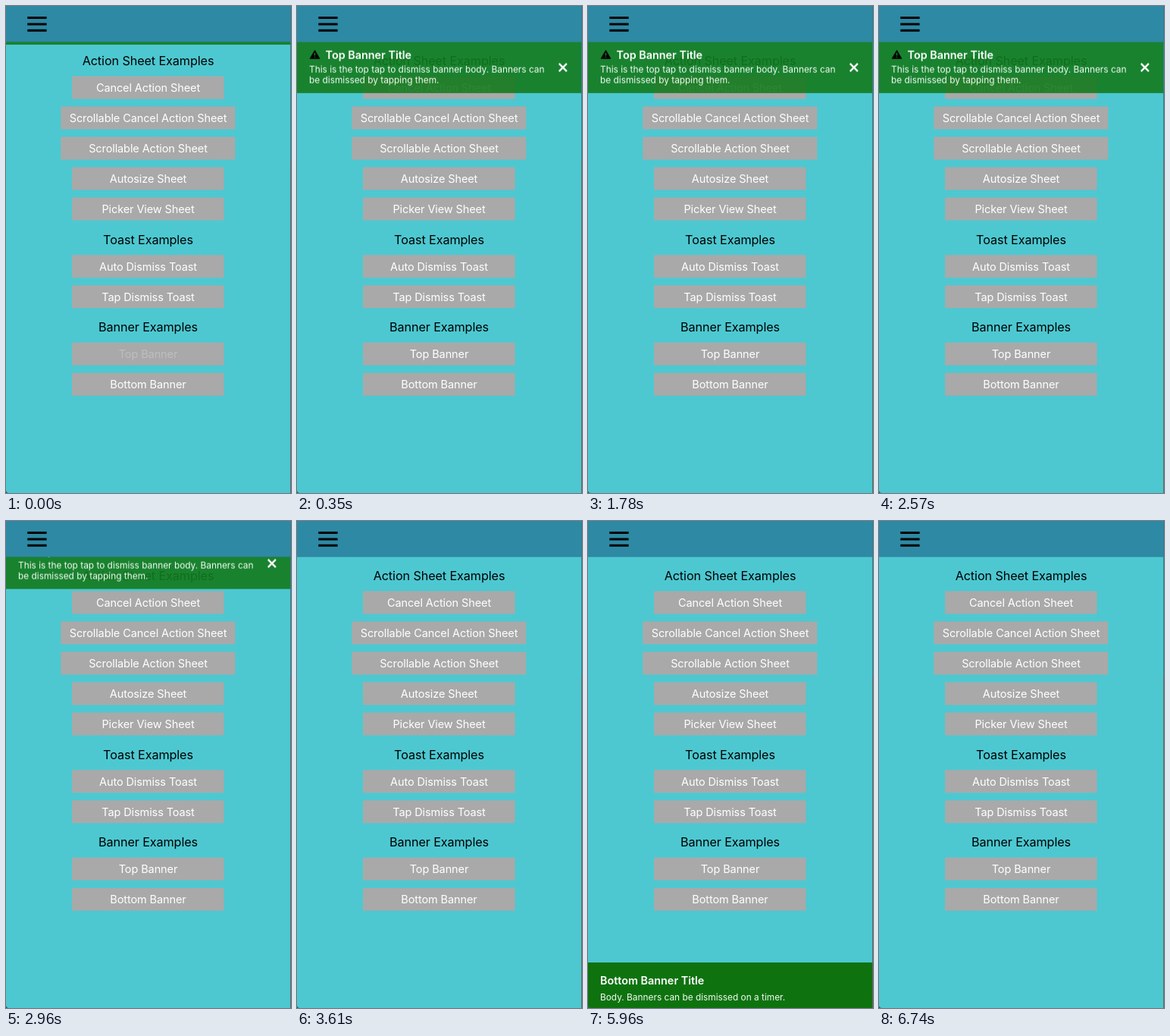
An HTML page for the animation above (6.78 s loop, 376 by 642 pixels).

```html
<!DOCTYPE html>
<html lang="en">
<head>
<meta charset="utf-8">
<title>Banner demo</title>
<style>
  html, body { margin: 0; width: 100%; height: 100%; overflow: hidden; background: #26565c; }
  svg { display: block; width: 376px; height: 642px; font-family: Inter, "Open Sans", sans-serif; }
  .heading { font-size: 16.2px; letter-spacing: -.1px; text-anchor: middle; }
  .label { font-size: 14.5px; letter-spacing: -.1px; text-anchor: middle; fill: #fff; }
  .title { font-size: 14.4px; font-weight: 600; fill: #fff; }
  .body { font-size: 11.87px; fill: #f4faf4; }
</style>
</head>
<body>
<svg viewBox="0 0 376 642">
  <defs><clipPath id="screen"><path d="M0 0H376V642H4Q0 642 0 638Z"/></clipPath></defs>
  <g clip-path="url(#screen)">
    <rect width="376" height="642" fill="#4dc8d1"/>
    <g id="menu"></g>

    <g id="top">
      <rect y="47" width="376" height="68" fill="#157b1d" fill-opacity=".9"/>
      <path d="M23.5 58.5L29.8 69.3H17.2Z" stroke="#000" stroke-linejoin="round"/>
      <path d="M23.5 61.8V65.4M23.5 66.7V68" stroke="#1b832f" stroke-width="1.4"/>
      <text class="title" x="37.5" y="70">Top Banner Title</text>
      <text class="body" x="16" y="87.5">This is the top tap to dismiss banner body. Banners can</text>
      <text class="body" x="16" y="101.5">be dismissed by tapping them.</text>
      <path d="M345.7 75.9L355.9 86.1M355.9 75.9L345.7 86.1" stroke="#fff" stroke-width="2.3"/>
    </g>

    <rect width="376" height="47" fill="#2e89a4"/>
    <path d="M0 47H376" stroke="#2c829c" stroke-width=".8"/>
    <path d="M28.3 15.5H53.6M28.3 24H53.6M28.3 32.2H53.6" stroke="#000" stroke-width="2.9"/>

    <g id="bottom">
      <rect y="582" width="376" height="60" fill="#0e730f"/>
      <text class="title" x="16" y="611">Bottom Banner Title</text>
      <text class="body" x="16" y="632">Body. Banners can be dismissed on a timer.</text>
    </g>
    <path d="M375.5 0V205" stroke="#2f7f8a"/>
    <path d="M375.5 205V642" stroke="#62665e"/>
  </g>
</svg>
<script>
const LOOP = 6780;
const NS = "http://www.w3.org/2000/svg";
const menu = document.getElementById("menu");

function add(tag, attrs, text = "") {
  const el = document.createElementNS(NS, tag);
  for (const key in attrs) el.setAttribute(key, attrs[key]);
  el.textContent = text;
  return menu.appendChild(el);
}

const heading = (y, text) => add("text", { class: "heading", x: 187.5, y }, text);

function button(y, text, width = 200.5) {
  add("rect", { x: 187.3 - width / 2, y, width, height: 30, fill: "#a9a9a9" });
  return add("text", { class: "label", x: 187.5, y: y + 20.5 }, text);
}

heading(78, "Action Sheet Examples");
button(92.5, "Cancel Action Sheet");
button(132.5, "Scrollable Cancel Action Sheet", 230);
button(172.5, "Scrollable Action Sheet", 230);
button(212.5, "Autosize Sheet");
button(252.5, "Picker View Sheet");
heading(313.5, "Toast Examples");
button(328.2, "Auto Dismiss Toast");
button(368.2, "Tap Dismiss Toast");
heading(429, "Banner Examples");
const topLabel = button(443.7, "Top Banner");
const bottomLabel = button(483.7, "Bottom Banner");

// Each step: [time in ms, value, easing towards the next step]
function play(el, steps, style) {
  const frames = steps.map(([time, value, easing = "linear"]) =>
    ({ offset: time / LOOP, easing, ...style(value) }));
  el.animate(frames, { duration: LOOP, iterations: Infinity });
}

const slide = y => ({ transform: `translateY(${y}px)` });
const fade = opacity => ({ opacity });

play(document.getElementById("top"), [
  [0, -64, "cubic-bezier(.3,.3,.58,1)"], [250, 0],
  [2834, 0, "ease-in-out"], [3134, -68], [LOOP, -68]
], slide);

play(document.getElementById("bottom"), [
  [0, 62], [3800, 62, "ease-in-out"], [4100, 0],
  [6380, 0, "ease-in-out"], [6680, 62], [LOOP, 62]
], slide);

play(topLabel, [[0, .25], [250, 1], [LOOP, 1]], fade);
play(bottomLabel, [[0, 1], [3700, 1], [3700, .25], [3820, .25], [4070, 1], [LOOP, 1]], fade);
</script>
</body>
</html>
```
